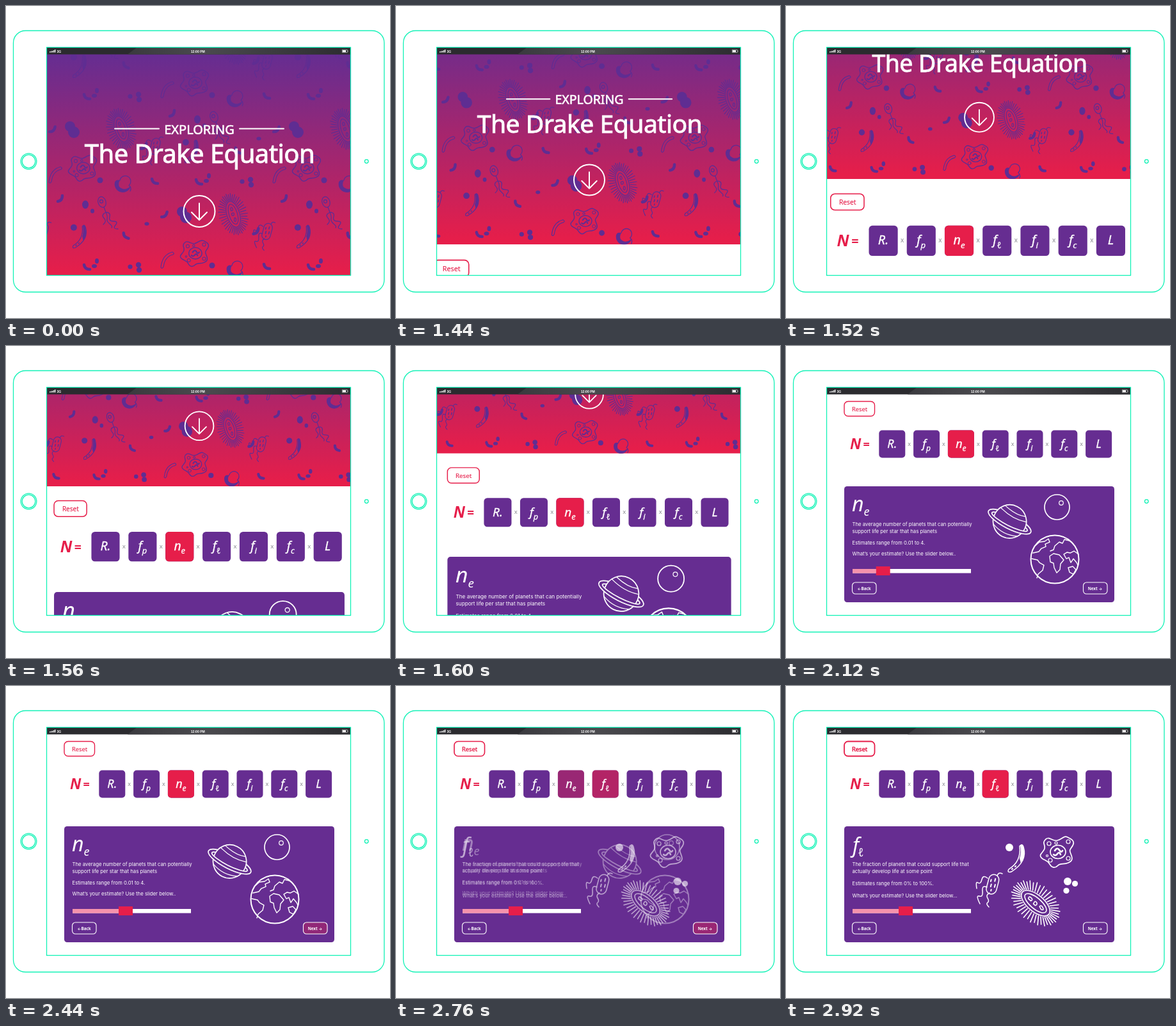
An HTML page for the animation above (3880 ms loop, 600 by 487 pixels).

```html
<!DOCTYPE html>
<html lang="en">
<head>
<meta charset="utf-8">
<title>Exploring the Drake Equation</title>
<style>
  html, body { margin: 0; height: 100%; overflow: hidden; background: #fff; }
  svg { display: block; width: 100vw; height: 100vh; }
  text { font-family: "Noto Sans", "Open Sans", Inter, "DejaVu Sans", sans-serif; fill: #fff; }
  .mid { text-anchor: middle; }
  .line { fill: none; stroke: currentColor; stroke-linecap: round; stroke-linejoin: round; }
  .fill { fill: currentColor; }
  .white { color: #fff; }
  .mint { fill: none; stroke: #12f2b6; stroke-width: 1.3; }
  .copy text { font: 7.8px Inter, "Open Sans", sans-serif; }
  .copy .symbol { font: italic 32px "Noto Sans", "DejaVu Sans", sans-serif; }
  .sys { font: bold 5.1px "Liberation Sans", sans-serif; }
  .btn { font-size: 6.3px; font-weight: 600; }
</style>
</head>
<body>
<svg viewBox="0 0 600 487" preserveAspectRatio="none">
  <defs>
    <linearGradient id="dusk" gradientUnits="userSpaceOnUse" x1="0" y1="78" x2="0" y2="416">
      <stop stop-color="#662d91"/><stop offset="1" stop-color="#e61e4a"/>
    </linearGradient>
    <linearGradient id="gloss">
      <stop stop-color="#3a3a3e"/><stop offset=".35" stop-color="#4a4a4e"/><stop offset="1" stop-color="#2c2c30"/>
    </linearGradient>
    <clipPath id="screen"><path d="M64 65h474v355.500H64z"/></clipPath>
    <clipPath id="heroBox"><path d="M0 50h604v373.500H0z"/></clipPath>

    <g id="amoeba" class="line" stroke-width="1.7">
      <path d="M-18-20C-12-25-8-16 0-18S10-26 16-23 28-17 24-10 18-4 21 3 24 14 17 17 5 17 1 21-8 26-12 19-20 14-25 9-22 1-20-5-25-14-18-20z"/>
      <ellipse cx="1" rx="12" ry="10.500"/>
      <path stroke-width="2.600" d="M-6 4Q-3 7 0 3T5 4M-4-2Q0-8 3-3T8-2"/>
      <g stroke-width="1.200">
        <circle cx="-13" cy="-13" r="3"/><circle cx="-2" cy="-14" r="2"/><circle cx="17" cy="-16" r="3"/>
        <circle cx="17" cy="10" r="3"/><circle cx="-11" cy="13" r="3"/><circle cx="-16" cy="6" r="1.500"/>
      </g>
    </g>
    <g id="swimmer" class="line" stroke-width="1.500">
      <g transform="translate(5 -9) rotate(15)">
        <rect x="-8" y="-15" width="16" height="31" rx="8"/>
        <path d="M-4-6v3M2-9v4M-2 1v4M4 0v4M0 9v2" stroke-width="2"/>
      </g>
      <path d="M-3-18Q-10-24-12-16T-18-11-20-2M-4-4Q-12-8-11 2T-16 10-15 22M0 5Q-6 8-3 13T-3 20-1 27M12-22Q14-28 20-25"/>
    </g>
    <g id="jelly">
      <circle class="fill" cx="-11" cy="-16" r="6"/>
      <path class="line" stroke-width="1.500" d="M5-18Q9-23 11-17Q18 6-8 22Q-15 24-12 18Q8 6 5-18z"/>
      <path class="fill" d="M6-19Q11-22 11-15Q15 0 7 9L5 1Q8-8 6-19z"/>
      <path class="line" stroke-width="2" d="M-1 13l-1 1M-6 17l-1 1"/>
    </g>
    <g id="tadpole" class="line" stroke-width="1.300">
      <ellipse cx="-7" cy="-16" rx="6" ry="8.500" transform="rotate(-18 -7 -16)"/>
      <circle cx="-8" cy="-17" r="2.500"/>
      <path d="M-4-8L-1 0Q-9 4-4 9T-5 19M-1 0Q7 0 5 7T11 14 14 20 18 26M-1 0Q2 6 1 10T5 18 8 24"/>
    </g>
    <g id="bud">
      <path class="fill" d="M-13-3A12.500 12.500 0 1 0 12 3Q2 12-6 4Q-8-1-5-6Q-11-8-13-3z"/>
      <path class="line" stroke-width="1.300" d="M-5-6A8.500 8.500 0 1 1 9 2Q14 6 11 11"/>
    </g>
    <path id="tube" class="line" stroke-width="1.200" d="M-10 12Q-8-8 8-12Q12-10 9-8Q-4-5-6 11Q-8 15-10 12z"/>
    <path id="bean" fill="none" stroke="currentColor" stroke-width="4.600" stroke-linecap="round" d="M-5-4Q-4 3 4 3"/>
    <g id="spiky" class="line" stroke-width="1.600">
      <ellipse rx="13" ry="27"/><ellipse rx="8.500" ry="21"/>
      <path d="M-2-13q4-3 4 2t-4 3zM-3-2q6-2 5 2t-5 2zM0 8q4 0 2 5t-4 0z"/>
      <g id="spikes"></g>
    </g>
  </defs>

  <g clip-path="url(#screen)">
    <g id="page">
      <g clip-path="url(#heroBox)">
        <path fill="url(#dusk)" d="M0 50h604v373.500H0z"/>
        <g id="germs" color="#5f2d92"></g>
        <g class="white">
          <path class="line" stroke-width="2" stroke-linecap="butt" d="M170 191.500h69M365 191.500h69"/>
          <text class="mid" x="302" y="199.500" font-size="20" stroke="#fff" stroke-width=".6">EXPLORING</text>
          <text class="mid" x="302.500" y="245" font-size="40" letter-spacing="-.55" stroke="#fff" stroke-width=".9">The Drake Equation</text>
          <g class="line" stroke-width="2"><circle cx="302" cy="320.500" r="24.500"/><path d="M302 308v25M290 322l12 12 12-12"/></g>
        </g>
      </g>

      <g transform="translate(302 346.500) scale(1.17647) translate(-302 0)">
        <rect id="resetBox" x="91" y="86.500" width="47.500" height="23" rx="6" fill="none" stroke="#e61e4a"/>
        <text id="resetText" class="mid" x="115" y="101.500" font-size="9.300" style="fill:#e61e4a" stroke="#e61e4a">Reset</text>
        <text x="100" y="161" font-size="23" font-weight="bold" font-style="italic" style="fill:#e61e4a">N</text>
        <text x="120.500" y="160" font-size="18" font-weight="bold" style="fill:#e61e4a">=</text>
        <g id="terms"></g>

        <rect x="91" y="219" width="422" height="181" rx="4.500" fill="#662d91"/>
        <g id="planets" class="copy">
          <text class="symbol" x="103" y="257.500">n<tspan dy="7" font-size="18">e</tspan></text>
          <text x="103.500" y="281">The average number of planets that can potentially</text>
          <text x="103.500" y="291.500">support life per star that has planets</text>
          <text x="103.500" y="309.500">Estimates range from 0.01 to 4.</text>
          <text x="103.500" y="326.500">What’s your estimate? Use the slider below..</text>
          <g class="line white" stroke-width="1.700">
            <g transform="translate(349.500 274) rotate(27)">
              <path d="M-25.800 3A26 26 0 1 1 25.800 3M-24.600 8.400A26 26 0 0 0 24.600 8.400"/>
              <path d="M-25-8A37 11 0 1 0 25-8M-26-3A31 6 0 1 0 26-3"/>
              <path stroke-width="1.200" d="M-17-19Q4-13 18-18M-22-13Q2-5 23-11M-21 15Q0 24 21 15"/>
            </g>
            <circle cx="423.500" cy="251.500" r="19.500"/><circle cx="430" cy="245" r="3.300" stroke-width="1.200"/>
            <circle cx="420" cy="333" r="37.500" stroke-width="2"/>
            <path stroke-width="1.400" d="M388 313l8-7 8-1 6-4 2 5-7 3 1 4-7 3-4 5-9 2M384 332l9 2 3 4 7 4-2 8-7 6-2 6M412 328l6-4 9 2 7 8-5 6-1 9-5 5-4-8-1-7-5-2zM413 320l5-2 2-6 7-6 5 2 3-6 8 2 6 5M457 325l-7-5-6 3-5-1-5 3 4 7 4-2 3 8 4-6 5 6 2 4M441 346l7-2 5 5-4 7-6-3z"/>
          </g>
        </g>
        <g id="life" class="copy">
          <text class="symbol" x="104" y="260">f<tspan dx="-2" dy="6" font-size="18">ℓ</tspan></text>
          <text x="103.500" y="281">The fraction of planets that could support life that</text>
          <text x="103.500" y="291.500">actually develop life at some point</text>
          <text x="103.500" y="310.500">Estimates range from 0% to 100%.</text>
          <text x="103.500" y="330">What’s your estimate? Use the slider below...</text>
          <g class="white">
            <use href="#amoeba" x="424" y="259"/>
            <use href="#swimmer" x="318" y="318"/>
            <use href="#jelly" x="360" y="268"/>
            <use href="#spiky" transform="translate(390 339) rotate(-50)"/>
            <g class="fill"><circle cx="440" cy="305" r="6"/><circle cx="451.500" cy="308.500" r="4.600"/><circle cx="438" cy="319.500" r="4.600"/></g>
          </g>
        </g>
        <path fill="#fff" d="M104 348h185v6.500H104z"/>
        <rect id="track" x="104" y="348" height="6.500" fill="#f592ac"/>
        <rect id="knob" y="344" width="22" height="14" fill="#e61e4a"/>
        <g stroke="#fff" stroke-width="1.100">
          <rect x="103.500" y="369" width="37.500" height="18" rx="5" fill="none"/>
          <rect id="next" x="464.500" y="369" width="37.500" height="18" rx="5" fill="#e61e4a"/>
        </g>
        <text class="btn mid" x="122" y="380.500">←Back</text>
        <text class="btn mid" x="483" y="380.500">Next →</text>
      </g>
    </g>

    <path fill="#2b2b2f" d="M64 65h474v10.500H64z"/>
    <path fill="url(#gloss)" d="M204 65h334v10.500H190z"/>
    <path fill="#fff" d="M68 71h1.300v1.500H68zM70 70.500h1.300v2H70zM72 70h1.300v2.500H72zM74 69h1.300v3.500H74zM76 68h1.300v4.500H76zM526 69h5v3h-5z"/>
    <path fill="none" stroke="#ddd" stroke-width=".6" d="M525.300 68.300h8v4.300h-8zM534.300 69.500v2"/>
    <text class="sys" x="79.500" y="72.500">3G</text>
    <text class="sys mid" x="299.800" y="72.500">12:00 PM</text>
  </g>

  <g class="mint">
    <rect x="11.500" y="38.500" width="579.500" height="408" rx="19"/>
    <rect x="63.500" y="64.500" width="475" height="356"/>
    <circle cx="35.500" cy="242.500" r="12.300"/><circle cx="35.500" cy="242.500" r="10.300"/>
    <circle cx="563.300" cy="242.500" r="2.800"/>
  </g>
</svg>

<script>
const $ = id => document.getElementById(id);
const set = (id, attrs) => Object.entries(attrs).forEach(([k, v]) => $(id).setAttribute(k, v));
const times = (n, f) => Array.from({ length: n }, (_, i) => f(i)).join('');
const place = (id, x, y, scale = 1, turn = 0) =>
  `<use href="#${id}" transform="translate(${x} ${y}) rotate(${turn}) scale(${scale})"/>`;

// Hairs around the spiky microbe
$('spikes').innerHTML = times(42, i => {
  const a = i / 42 * 2 * Math.PI, c = Math.cos(a), s = Math.sin(a), out = 12 + i % 2 * 2;
  return `<path d="M${c * 15} ${s * 29}L${c * (15 + out)} ${s * (29 + out)}"/>`;
});

// One set of microbes, repeated on a half-drop lattice
const beans = [[85, 300, -90], [188, 359, 10], [127, 408, 0], [408, 407, 0], [248, 325, -80], [391, 351, -85]];
const dots = [[124, 310, 5, 6.5], [135, 320, 3, 3.5], [147, 272, 4.5, 4.5], [138, 406, 4, 3], [142, 398, 3, 4],
  [194, 407, 3.6, 3.6], [207, 404, 4.2, 4.2], [208, 412, 4.2, 4.2], [220, 340, 3.6, 2.8], [275, 321, 8, 8], [281, 330, 9, 9]];
const germs =
  place('spiky', 355, 325, .77, -17) + place('amoeba', 295, 386, .85) + place('swimmer', 404, 359, .83) +
  place('jelly', 115, 359, .83) + place('tadpole', 157, 322) + place('tube', 252, 396) + place('bud', 183, 278) +
  beans.map(([x, y, turn]) => place('bean', x, y, 1, turn)).join('') +
  dots.map(([x, y, rx, ry]) => `<ellipse class="fill" cx="${x}" cy="${y}" rx="${rx}" ry="${ry}"/>`).join('');
$('germs').innerHTML = times(7, i => times(5, j =>
  (i + j) % 2 ? '' : `<g transform="translate(${(i - 3) * 175} ${(j - 3) * 133})">${germs}</g>`));

// Equation terms
$('terms').innerHTML = ['R.', 'fp', 'ne', 'fℓ', 'fi', 'fc', 'L'].map((name, i) => {
  const x = 145.3 + 53.8 * i, sub = name[1] === '.' ? '.' : `<tspan dy="5" font-size="12">${name[1] || ''}</tspan>`;
  const box = (fill, id = '') => `<rect ${id} x="${x}" y="131.500" width="41" height="43" rx="5" fill="${fill}"/>`;
  return box('#662d91') + (i === 2 || i === 3 ? box('#e61e4a', `id="hot${i}"`) : '') +
    `<text class="mid" x="${x + 20.5}" y="158.500" font-size="18" font-style="italic" stroke="#fff" stroke-width=".3">${name[0]}${sub}</text>` +
    (i < 6 ? `<text class="mid" x="${x + 47.4}" y="155.500" font-size="9" style="fill:#8c8c94">x</text>` : '');
}).join('');

function draw(now) {
  const t = now % 3880;
  const steps = (start, n) => Math.max(0, Math.min(n, Math.floor((t - start) / 40) + 1)) / n;
  const scroll = steps(1440, 7), slide = steps(2120, 3), press = steps(2440, 3), fade = steps(2560, 10);
  const scale = 1 - .15 * scroll, knob = 123 + 53 * slide;
  set('page', { transform: `translate(${302 * (1 - scale)} ${-294.5 * scroll}) scale(${scale})` });
  set('knob', { x: knob });
  set('track', { width: knob - 104 });
  set('next', { 'fill-opacity': press * (1 - fade) });
  set('planets', { opacity: 1 - fade });
  set('life', { opacity: fade });
  set('hot2', { opacity: 1 - fade });
  set('hot3', { opacity: fade });
  set('resetBox', { 'stroke-width': 1.4 + .4 * fade });
  set('resetText', { 'stroke-width': .1 + .4 * fade });
  requestAnimationFrame(draw);
}
draw(performance.now());
</script>
</body>
</html>
```
